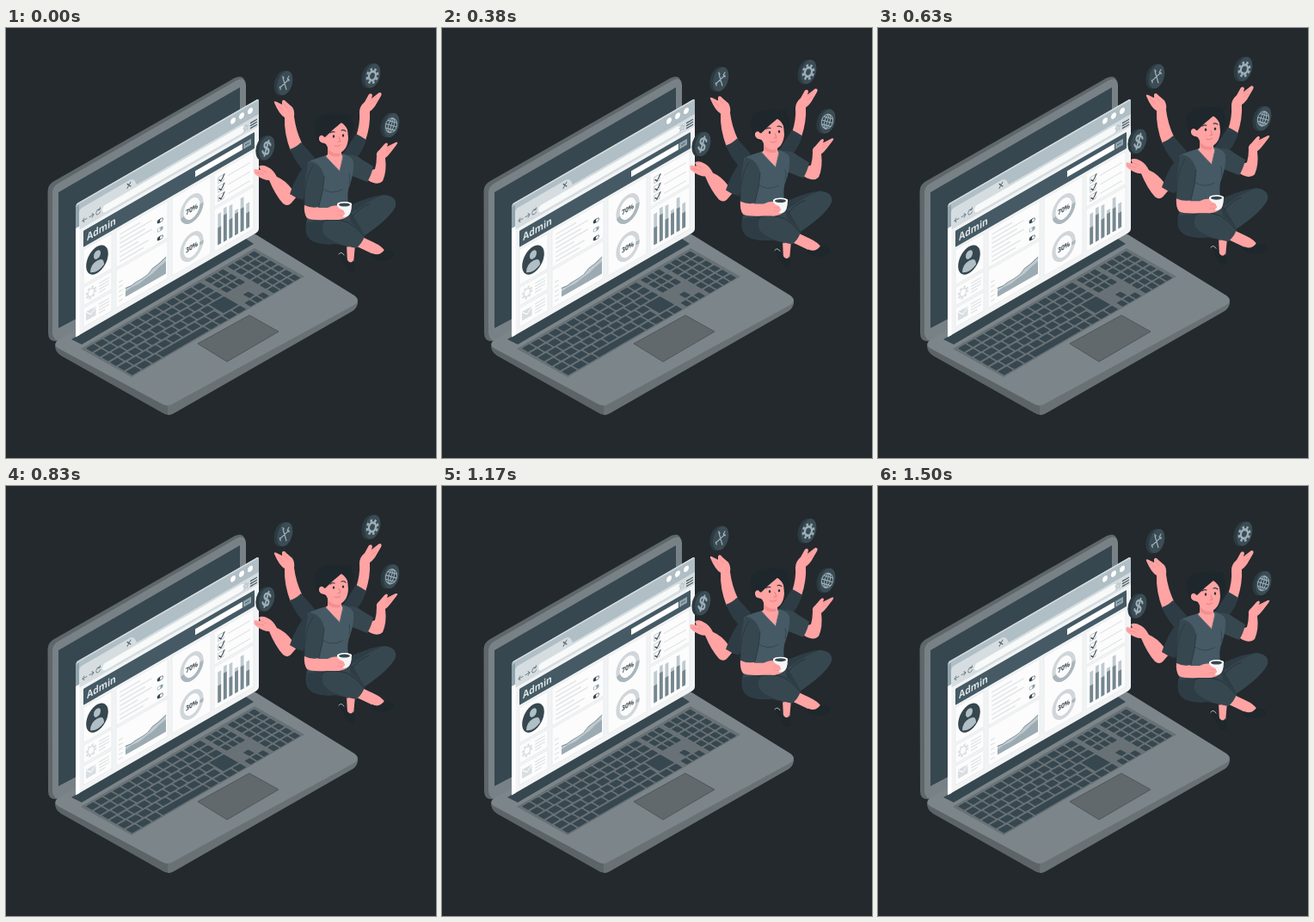
An HTML page that plays this animation: 500 by 500 pixels, repeating every 1540 ms.

```html
<!DOCTYPE html>
<html lang="en">
<head>
<meta charset="utf-8">
<title>Admin dashboard</title>
<style>
html,body{margin:0;width:100%;height:100%;overflow:hidden;background:#23292d}
svg{display:block;width:100vw;height:100vh}
text{font-family:"Open Sans",sans-serif;font-weight:700}
.skin{fill:#ffa3a3}.shade{fill:#f28f8f}
.shirt{fill:#455a64}.cloth{fill:#37474f}.fold{fill:#2e3d45}.hair{fill:#1d272c}
.line{fill:none;stroke-linecap:round;stroke-linejoin:round}
</style>
</head>
<body>
<svg viewBox="0 0 500 500">
  <!-- laptop lid -->
  <path fill="#5f676b" d="M48.500 190Q48.500 182 56 178L266 58Q277 53 278 64V250L62 364Q49 366 49 355Z"/>
  <path fill="#788186" d="M54 192Q54 185 60 181L268 61Q278 56 279 66V250L64 364Q54 364 54 354Z"/>
  <path fill="#37474f" d="M61 191L272 69V238L61 349Z"/>
  <!-- laptop base -->
  <path fill="#5d6468" d="M57 367Q56 376 64 381L181 447Q188 452 195 448L403 329Q409 325 409 318L230 300Z"/>
  <path fill="#697175" d="M188 439V450Q192 450 195 448L403 329Q409 325 409 318Z"/>
  <path fill="#7c858a" d="M60 372Q54 367 62 362L276 240Q284 236 292 241L405 311Q413 317 405 322L194 437Q188 441 181 437Z"/>
  <path fill="#37474f" d="M76 362L279 245L288 251L88 368Z"/>
  <path fill="#687175" d="M87 373L289 256L347 289L146 406Z"/>
  <path fill="#62696c" stroke="#50575a" d="M223 367L283 334L317 353L257 388Z"/>
  <g id="keys" fill="#37474f" transform="matrix(.862 -.498 .845 .488 91 372.500)"></g>

  <!-- browser window, drawn flat and skewed -->
  <g transform="translate(81 205) skewY(-30)">
    <rect width="213" height="154.500" rx="3" fill="#f1f3f4"/>
    <path fill="#b0bec5" d="M0 3Q0 0 3 0H210Q213 0 213 3V19H0Z"/>
    <rect x="1" width="211" height="1.600" rx=".8" fill="#d3dbdf"/>
    <path fill="#d5dde0" d="M4 32V12Q4 8 8 8H62Q67 8 69 13L71 18H213V32Z"/>
    <rect y="3" width="4" height="30" fill="#90a4ae"/>
    <rect y="28" width="4.500" height="126.500" fill="#fff"/>
    <rect x="31" y="20.500" width="165" height="8.500" rx="4.200" fill="#f8f9f9"/>
    <g fill="#fff"><ellipse cx="183" cy="8.500" rx="3" ry="3.400"/><ellipse cx="193" cy="8.500" rx="3" ry="3.400"/><ellipse cx="203" cy="8.500" rx="3" ry="3.400"/></g>
    <path class="line" stroke="#4a5a62" d="M60 11l4 5m0-5l-4 5"/>
    <path class="line" stroke="#6b7b83" stroke-width=".9" d="M8 24h5m-5 0l2-2.300m-2 2.300l2 2.300M16 24h5m0 0l-2-2.300m2 2.300l-2 2.300M28 22a2.400 2.800 0 1 0 .5 3M28.400 20v2.300h-2"/>
    <path class="line" stroke="#45545c" stroke-width="1.300" d="M203.500 23h7m-7 3h7m-7 3h7"/>
    <path fill="none" stroke="#b4c0c5" stroke-width=".8" d="M198 22l.9 2 2.100.3-1.500 1.600.4 2.300-1.900-1-1.900 1 .4-2.300-1.500-1.600 2.100-.3z"/>
    <rect x="9" y="36" width="199" height="19" rx="1" fill="#455a64"/>
    <text transform="translate(13 50) scale(.866 1)" font-size="12" fill="#dfe5e8">Admin</text>
    <rect x="139" y="41.500" width="55" height="7" fill="#fff"/>
    <rect x="195" y="41.500" width="9" height="7" fill="#90a4ae"/>
    <path stroke="#455a64" stroke-width=".8" d="M197 45h5"/>
    <g fill="#fcfcfc" stroke="#e7eaeb" stroke-width=".8">
      <rect x="9" y="58" width="33" height="41"/><rect x="9" y="102" width="33" height="21"/><rect x="9" y="126" width="33" height="22"/>
      <rect x="47" y="58" width="60" height="43"/><rect x="47" y="104" width="60" height="44"/>
      <rect x="112" y="58" width="45" height="90"/><rect x="161" y="58" width="46" height="38"/><rect x="161" y="99" width="46" height="49"/>
    </g>
    <!-- profile, settings and mail cards -->
    <ellipse cx="25" cy="79" rx="12.800" ry="15.500" fill="#37474f"/>
    <ellipse cx="25" cy="73" rx="4" ry="4.800" fill="#b0bec5"/>
    <path fill="#b0bec5" d="M17 89Q17 80 25 80T33 89Q25 95 17 89Z"/>
    <ellipse cx="18" cy="113" rx="3.800" ry="4.500" fill="none" stroke="#d8dee1" stroke-width="1.500"/>
    <ellipse cx="18" cy="113" rx="5.300" ry="6.200" fill="none" stroke="#d8dee1" stroke-width="2" stroke-dasharray="2.300 2.250"/>
    <rect x="12" y="132" width="11.500" height="10.500" fill="#d8dee1"/>
    <path class="line" stroke="#fff" d="M12.500 133l5.300 5 5.300-5"/>
    <g id="lines" fill="#dfe3e5"></g>
    <g id="toggles"></g>
    <!-- area chart -->
    <path fill="#bfcad0" d="M58 131L64 132L70 131L78 131L84 130L90 126L96 125L105 122V141H58Z"/>
    <path fill="#9cabb2" d="M58 135L66 134L74 135L82 133L90 132L97 129L105 127V141H58Z"/>
    <path class="line" stroke="#6f8089" stroke-width=".8" d="M58 131L64 132L70 131L78 131L84 130L90 126L96 125L105 122"/>
    <g id="rings" fill="none" stroke-width="4.200"></g>
    <g fill="#37474f" font-size="8" text-anchor="middle">
      <text transform="translate(135 86.500) scale(.866 1)">70%</text>
      <text transform="translate(135 130.500) scale(.866 1)">30%</text>
    </g>
    <g id="checks" class="line" stroke="#37474f" stroke-width="1.200"></g>
    <g id="bars"></g>
  </g>

  <g id="float">
    <!-- far arms -->
    <path class="skin" d="M331 143Q323 122 324 104Q318 101 312 87Q311 84 315 86L321 89L321 85Q323 82 326 86L333 92Q336 97 335 103Q337 119 344 134Z"/>
    <path class="line" stroke="#f28f8f" stroke-width=".8" d="M316 90l6 5m1-7l4 5"/>
    <path class="fold" d="M330 141Q337 139 343 133L359 151L349 169Q338 159 330 141Z"/>
    <path class="skin" d="M407 126Q412 111 411 98Q411 91 417 86L422 77Q425 75 426 78L425 82L434 75Q438 75 436 79L429 91Q426 95 423 97Q424 113 418 131Z"/>
    <path class="line" stroke="#f28f8f" stroke-width=".8" d="M424 84l7-4m-6 8l6-4"/>
    <path class="fold" d="M391 148L407 123Q413 126 419 130Q414 146 404 155Z"/>
    <path class="skin" d="M419 164Q425 166 429 164Q431 157 431 149Q430 145 434 142L440 135Q443 132 444 135L443 138L453 133Q457 132 454 136L447 145Q444 149 441 151Q443 167 438 178Q432 184 421 177Z"/>
    <path class="line" stroke="#f28f8f" stroke-width=".8" d="M442 141l7-4m-7 7l5-3"/>
    <path class="cloth" d="M393 148Q406 146 414 153L427 161Q425 171 420 179L400 171Z"/>
    <path class="skin" d="M341 186Q335 185 333 188Q325 177 315 173Q311 165 305 162Q298 158 294 161L296 165L289 164Q287 168 291 171Q299 177 306 177Q313 194 322 204Q328 209 333 202L339 195Z"/>
    <path class="line" stroke="#f28f8f" stroke-width=".8" d="M291 168l9 2m-3-5l6 3"/>
    <path class="fold" d="M352 155Q339 167 330 193Q337 198 345 200L362 169Z"/>

    <!-- feet and legs -->
    <path class="skin" d="M396 252H406L404 274Q400 277 397 272Z"/>
    <path class="hair" d="M389 258Q393 263 397 270Q401 275 404 270Q407 279 404 283Q399 285 395 277L388 265Z"/>
    <path class="line" stroke="#d5dadd" stroke-width=".8" d="M387 263Q390 259 393 264"/>
    <path class="skin" d="M410 241L427 249Q438 254 441 260Q436 266 427 263L408 254Z"/>
    <path class="hair" d="M426 262Q434 266 440 258Q451 259 451 264Q448 270 437 270Q429 270 424 265Z"/>
    <path class="fold" d="M390 211Q420 196 439 194Q455 196 453 207Q447 221 415 243L397 255L386 240Z"/>
    <path class="cloth" d="M402 215Q424 199 440 194Q455 196 453 207Q447 221 417 241Z"/>
    <path class="cloth" d="M351 219Q345 238 354 246Q363 253 384 251L407 256Q414 251 417 242Q409 232 401 226L397 204Z"/>
    <path class="fold" d="M350 226Q346 239 354 246Q363 253 384 251L391 252Q375 247 369 239Q365 229 373 222Z"/>
    <path class="line" stroke="#263238" stroke-width="1" d="M367 225Q380 220 398 226Q408 232 416 242M403 219Q412 208 422 205"/>

    <!-- torso -->
    <path class="shirt" d="M351 156Q360 151 373 148L391 146Q402 149 404 155Q405 168 400 182Q396 190 398 205Q384 222 352 223Q354 202 350 185Z"/>
    <path class="line" stroke="#33444c" stroke-width=".9" d="M367 186Q378 195 391 188M399 169Q401 175 399 181"/>
    <path class="skin" d="M374 135L390 140V147L392 150L388 166Q379 158 372 149L374 147Z"/>
    <path class="shade" d="M374 140Q379 147 389 146L388 149Q379 151 374 145Z"/>
    <path class="line" stroke="#526973" stroke-width="1" d="M371 149Q379 157 388 167L392 149"/>
    <!-- head -->
    <path class="hair" d="M360 122Q356 107 368 102Q382 98 402 101L401 106Q407 115 401 126Q398 134 390 136L371 137Q362 137 360 122Z"/>
    <path class="skin" d="M370 126Q366 123 364 127Q363 133 370 134L372 135Q376 145 386 146Q397 143 398 128L397 117Q394 110 389 110Q377 114 371 126Z"/>
    <path class="hair" d="M369 126Q364 111 374 105Q390 102 402 107Q403 115 398 121Q396 114 390 110Q381 117 371 127Z"/>
    <ellipse cx="381" cy="126" rx="1.200" ry="1.700" fill="#263238"/>
    <ellipse cx="392" cy="125" rx="1.200" ry="1.700" fill="#263238"/>
    <path class="line" stroke="#263238" stroke-width="1.100" d="M377 122Q379 120 382 121M390 119Q393 118 395 120"/>
    <path class="line" stroke="#e27a7c" stroke-width=".9" d="M387 127l2 5-3 .5M382 137Q386 139 389 136"/>

    <!-- near arm and cup -->
    <path class="skin" d="M347 204Q346 216 350 221Q356 224 373 223L386 223Q395 222 398 218Q398 214 392 213L387 206L379 207L374 209L363 209V204Z"/>
    <path class="cloth" d="M352 155Q346 176 347 206Q355 210 364 208Q369 187 370 173Q366 156 352 155Z"/>
    <path class="line" stroke="#2b3940" stroke-width=".9" d="M357 160Q346 177 347 205M370 173Q369 190 364 207"/>
    <path fill="#f5f5f5" d="M385 205Q393 200 402 204Q402 217 397 219Q390 221 387 217Z"/>
    <ellipse cx="393.500" cy="205" rx="8.500" ry="3" fill="#fff"/>
    <ellipse cx="393.500" cy="205.500" rx="6.500" ry="2" fill="#37474f"/>
    <path class="skin" d="M379 208Q384 205 388 210Q394 212 393 214Q396 216 392 218Q392 223 384 223Z"/>
    <path class="line" stroke="#f28f8f" stroke-width=".7" d="M386 213l6 1m-7 3l7 1"/>

    <g id="coins"></g>
  </g>
</svg>
<script>
const $ = id => document.getElementById(id);
const rect = (x, y, w, h, more = "") =>
  `<rect x="${x}" y="${y}" width="${w}" height="${h}" ${more}/>`;
const each = (n, fn) => Array.from({length: n}, (_, i) => fn(i)).join("");

// Keyboard: main block, arrow cluster, number pad
function keyboard() {
  let out = "";
  const run = (from, to, n, row) => {
    const w = (to - from) / n;
    out += each(n, i => rect(from + i * w + 1, row * 11 + 1.2, w - 2, 8.6, 'rx="1"'));
  };
  run(0, 156, 13, 0);
  run(0, 156, 13, 1);
  run(0, 156, 12, 2);
  run(0, 134, 11, 3);
  out += rect(135, 34, 20, 20, 'rx="1"');
  run(0, 132, 10, 4);
  run(0, 42, 3, 5);
  run(42, 106, 1, 5);
  run(106, 156, 4, 5);
  [0, 1, 2, 5].forEach(r => run(160, 187, 3, r));
  run(169, 178, 1, 4);
  for (let r = 0; r < 6; r++) run(191, 229, 4, r);
  return out;
}
$("keys").innerHTML = keyboard();

const textLine = (x, y, w) => rect(x, y, w, 1.4, 'rx=".7"');
$("lines").innerHTML =
  each(4, i => textLine(27, 107 + i * 3.5, i == 3 ? 8 : 12)) +
  each(4, i => textLine(27, 131 + i * 3.5, i == 3 ? 8 : 12)) +
  each(7, i => textLine(51, 64 + i * 5.2, [24, 38, 30, 38, 22, 34, 28][i])) +
  each(5, i => textLine(50, 119 + i * 5.5, 5)) +
  each(3, i => textLine(177, 68 + i * 10.5, 26));

$("toggles").innerHTML = each(3, i => {
  const y = 75.7 + i * 10, on = i != 1;
  return rect(94.7, y - 2.2, 7, 4.4, `rx="2.2" fill="${on ? "#37474f" : "#90a4ae"}"`) +
    `<ellipse cx="${on ? 99.5 : 97}" cy="${y}" rx="1.6" ry="1.8" fill="#fff"/>`;
});

const ring = (y, part) => {
  const shape = `<ellipse cx="135" cy="${y}" rx="11.5" ry="14" pathLength="100"`;
  return `${shape} stroke="#d0d6d9"/>` +
    `${shape} stroke="#a9b6bc" stroke-dasharray="${part} 100" stroke-dashoffset="25"/>`;
};
$("rings").innerHTML = ring(83, 70) + ring(127, 30);

$("checks").innerHTML = each(3, i => {
  const y = 68 + i * 10.5;
  return rect(166, y - 3.5, 6, 7, 'stroke="#b4c0c5" stroke-width=".7"') +
    `<path d="M167 ${y}l2 2.500 4-6"/>`;
});

$("bars").innerHTML = each(6, i => {
  const x = 165.3 + i * 6.6, h = [36, 39, 38, 29, 39, 29][i], low = [20, 31, 22, 25, 27, 18][i];
  return rect(x, 143 - h, 3.8, h, 'fill="#bfcad0"') +
    rect(x, 143 - low, 3.8, low, 'fill="#75868e"');
});

// Floating icons
const glyphs = {
  tools: '<path class="line" stroke-width="1.300" d="M-4 -4.500L4.500 5.500M4 -5L-4 5M-5 -6l2 1m6-3l-1 3 3 1M-5 5l2 2"/>',
  gear: '<circle r="4.600" stroke-width="2.600"/><circle r="7" stroke-width="2.600" stroke-dasharray="2.750 2.750"/>',
  dollar: '<path class="line" stroke-width="2.200" d="M4 -4Q3 -6 0 -6Q-4 -6 -4 -3Q-4 0 0 0Q4 0 4 3Q4 6 0 6Q-3 6 -4 4M0 -8V8"/>',
  globe: '<circle r="7.500"/><ellipse rx="3.500" ry="7.500"/><path d="M0 -7.500V7.500M-7.500 0H7.500M-6.300 -4H6.300M-6.300 4H6.300"/>'
};
const coin = (name, x, y) => `<g transform="translate(${x} ${y}) rotate(16)">
  <ellipse cx="-2" cy=".6" rx="9" ry="14.800" fill="#2c3a41"/>
  <ellipse cx="1.200" cy="-.3" rx="8.600" ry="14.500" fill="#3b4c55"/>
  <g transform="translate(1) scale(.86 1.150)" fill="none" stroke="#9db0b9" stroke-width="1">${glyphs[name]}</g></g>`;
$("coins").innerHTML = coin("tools", 323, 64) + coin("gear", 425, 55.500) +
  coin("dollar", 302, 139.500) + coin("globe", 447, 113);

const LOOP = 1540, RISE = 8.2, LEAD = 30;
function draw(t) {
  const lift = RISE * (1 - Math.cos((t + LEAD) / LOOP * 2 * Math.PI)) / 2;
  $("float").setAttribute("transform", `translate(0 ${(-lift).toFixed(2)})`);
}
const start = performance.now();
function tick() {
  draw((performance.now() - start) % LOOP);
  requestAnimationFrame(tick);
}
tick();
</script>
</body>
</html>
```
